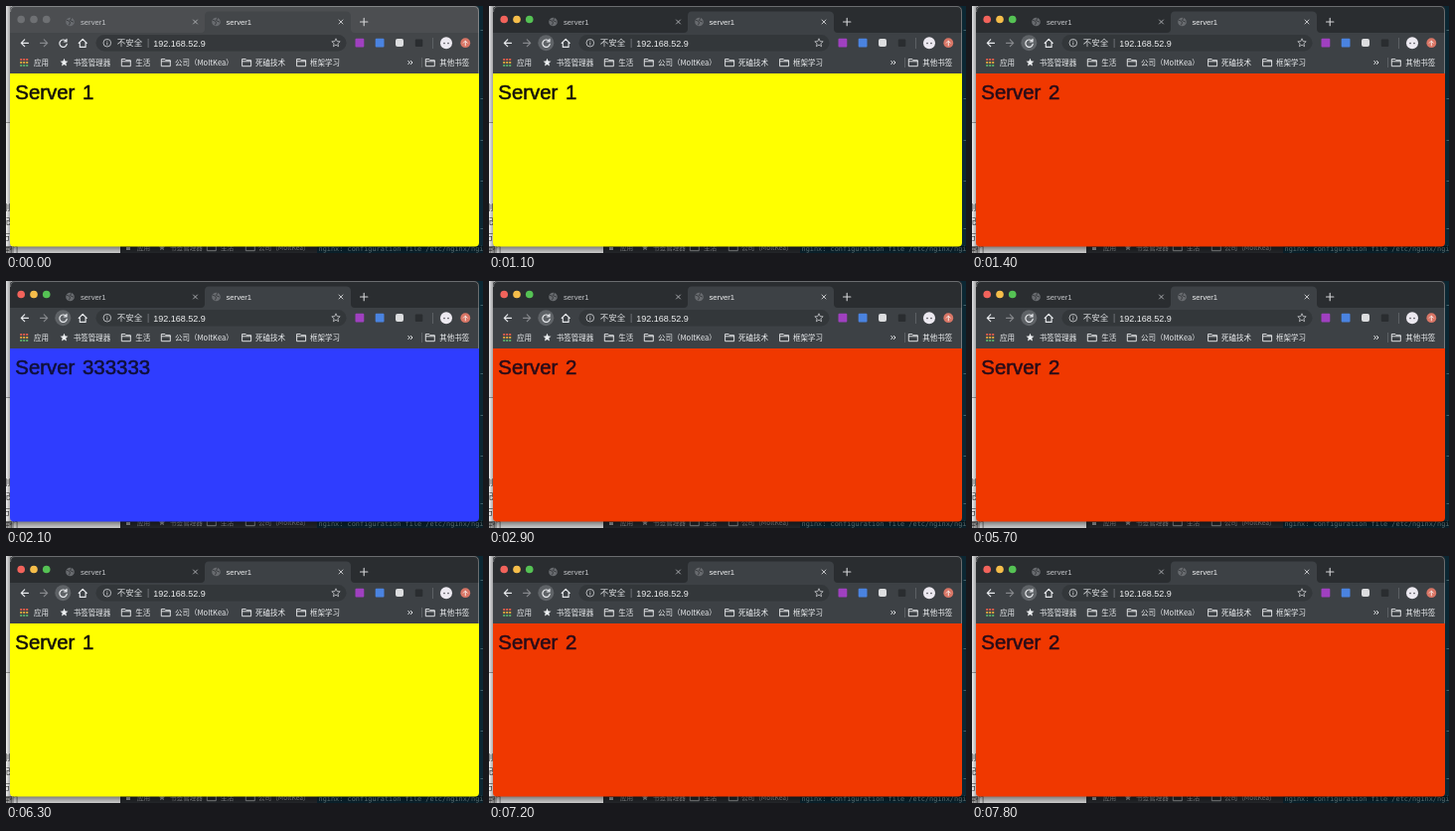
Recreate the animation shown at these times as an HTML page. Size 480 px wide and 249 px high, loop 8000 ms.

```html
<!DOCTYPE html>
<html lang="zh">
<head>
<meta charset="utf-8">
<title>Server demo</title>
<style>
html, body { margin: 0; width: 100%; height: 100%; overflow: hidden; background: #0b2733; }
svg { display: block; width: 100%; height: 100%; }
text { font-family: "Liberation Sans", "Noto Sans CJK SC", "Noto Sans CJK", sans-serif; white-space: pre; }
.cjk { font-family: "Noto Sans CJK SC", "Noto Sans CJK", sans-serif; font-weight: 500; }
.mono { font-family: "DejaVu Sans Mono", monospace; }
.line { fill: none; stroke-linecap: round; stroke-linejoin: round; }
#head { font-size: 20.4px; word-spacing: 2px; stroke-width: .55px; }
</style>
</head>
<body>
<svg id="stage" viewBox="0 0 480 249" preserveAspectRatio="none">
  <defs>
    <clipPath id="win"><rect x="4" y="0" width="472" height="242.5" rx="4"/></clipPath>
    <linearGradient id="edge">
      <stop offset="0" stop-color="#000" stop-opacity="0"/>
      <stop offset="1" stop-color="#000" stop-opacity=".35"/>
    </linearGradient>
    <linearGradient id="under" x2="0" y2="1">
      <stop offset="0" stop-color="#000" stop-opacity=".5"/>
      <stop offset="1" stop-color="#000" stop-opacity=".15"/>
    </linearGradient>
  </defs>
  <g id="desk"></g>
  <g clip-path="url(#win)">
    <rect id="strip" x="4" width="473" height="28"/>
    <path id="bar" d="M4 27H196Q200 27 200 23V10Q200 5.5 204 5.5H342Q347 5.5 347 10V23Q347 27 351 27H477V69H4Z"/>
    <rect id="page" x="4" y="68" width="473" height="175"/>
    <g id="chrome"></g>
    <text id="head" x="9.3" y="94"></text>
  </g>
  <path d="M4.5 6Q4.5 .5 9 .5H471Q475.5 .5 475.5 6V68" fill="none" stroke="#fff" stroke-opacity=".3"/>
</svg>
<script>
const LOOP = 8000;
const YELLOW = ['#ffff00', '#15120a', 'Server 1'];
const RED = ['#f03800', '#2a0c18', 'Server 2'];
const BLUE = ['#2f3dff', '#10103a', 'Server 333333'];
// Weighted round robin: the second server answers most reloads.
const PAGES = [[0, YELLOW], [1200, RED], [2000, BLUE], [2700, RED], [5900, YELLOW], [6800, RED]];
const FOCUS = 100;

const $ = id => document.getElementById(id);
function add(parent, tag, attrs, content) {
  const el = document.createElementNS('http://www.w3.org/2000/svg', tag);
  for (const k in attrs) el.setAttribute(k, attrs[k]);
  if (content) el.textContent = content;
  parent.appendChild(el);
  return el;
}
const rect = (p, x, y, width, height, fill, rx = 0) => add(p, 'rect', { x, y, width, height, fill, rx });
const dot = (p, cx, cy, r, fill) => add(p, 'circle', { cx, cy, r, fill });
const line = (p, d, stroke, w = 1) => add(p, 'path', { d, stroke, 'stroke-width': w, class: 'line' });
const label = (p, x, y, size, fill, str, cls = '') =>
  add(p, 'text', { x, y, 'font-size': size, fill, class: cls }, str);

function star(p, x, y, r, fill, stroke = 'none') {
  const pts = Array.from({ length: 10 }, (_, i) => {
    const a = i * Math.PI / 5 - Math.PI / 2, q = i % 2 ? r * 0.45 : r;
    return (x + q * Math.cos(a)).toFixed(2) + ',' + (y + q * Math.sin(a)).toFixed(2);
  });
  add(p, 'polygon', { points: pts.join(' '), fill, stroke, 'stroke-width': 0.8 });
}
const folder = (p, x, y, c) =>
  line(p, `M${x - 4.3} ${y - 3.5}h3.2l1 1.2h4.4v6h-8.6zM${x - 4.3} ${y - 1.2}h8.6`, c, 0.9);
const cross = (p, x, y, c) => line(p, `M${x - 2} ${y - 2}l4 4m0 -4l-4 4`, c, 0.9);

function drawDesk(g) {
  rect(g, 0, 0, 480, 249, '#0b2733');
  rect(g, 0, 0, 115, 249, '#f1f1f1');
  rect(g, 0, 0, 6, 117, '#e2e3e5');
  rect(g, 0, 117, 6, 1, '#999');
  [['刚', 206], ['配', 220], ['万', 236]].forEach(([c, y]) => label(g, -3.8, y, 8, '#333', c, 'cjk'));
  label(g, -4, 249, 8, '#333', '在们', 'cjk');
  rect(g, 115, 240, 198, 9, '#292c30');
  const c = '#a9abad';
  rect(g, 121, 243, 4, 3, c);
  [[132, '应用'], [165, '书签管理器'], [216, '生活'], [254, '公司（MoltKea）']]
    .forEach(([x, s]) => label(g, x, 246.4, 6.6, c, s, 'cjk'));
  star(g, 157, 243.5, 3.4, c);
  folder(g, 207, 243, c);
  folder(g, 246, 243, c);
  label(g, 314.5, 247, 6.9, '#7f999c', 'nginx: configuration file /etc/nginx/nginx.conf', 'mono');
  [24, 93, 135, 176, 224].forEach(y => rect(g, 477.5, y, 2.5, 1, '#416069'));
  rect(g, 0, 0, 5, 249, 'url(#edge)');
  rect(g, 0, 242, 480, 7, 'url(#under)');
}

function drawTabs(g) {
  [64.5, 211.5].forEach(x => {
    dot(g, x, 16, 4.3, '#686b6f');
    line(g, `M${x - 3} 14.5l2 .5 1 2 -1 2M${x + 1} 12.5l-1 2 3 1.5`, '#36383b', 0.9);
  });
  label(g, 75, 18.8, 7.7, '#c3c5c8', 'server1');
  label(g, 221.5, 18.8, 7.7, '#eeeff0', 'server1');
  cross(g, 190.5, 16, '#b4b6b9');
  cross(g, 337, 16, '#d0d1d3');
  line(g, 'M356.5 16h7.4m-3.7 -3.7v7.4', '#d5d6d8', 1.1);
}

function drawToolbar(g) {
  const c = '#e8eaed';
  line(g, 'M22.5 37.3h-7m3.2 -3.4l-3.4 3.4 3.4 3.4', c, 1.2);
  line(g, 'M34.5 37.3h7m-3.2 -3.4l3.4 3.4 -3.4 3.4', '#85878b', 1.2);
  line(g, 'M60.3 35.2a3.7 3.7 0 1 0 .9 3.2M61 33.4v2.6h-2.6', c, 1.2);
  line(g, 'M73.2 37.5l4 -4.2 4 4.2M74.3 37v4.4h5.8v-4.4', c, 1.1);
  add(g, 'circle', { cx: 101.8, cy: 37.2, r: 3.8, fill: 'none', stroke: '#c6c8cb', 'stroke-width': 0.9 });
  line(g, 'M101.8 36.9v2.1M101.8 35.1v.1', '#c6c8cb', 0.9);
  label(g, 111.7, 40.3, 8.5, '#dcdee0', '不安全', 'cjk');
  rect(g, 142.7, 33, 0.8, 9, '#7a7d81');
  label(g, 148.3, 40.5, 9, '#f1f2f3', '192.168.52.9');
  star(g, 332, 37.2, 4.4, 'none', '#c9cbce');
  rect(g, 351.5, 32.8, 8.8, 8.8, '#a040c0', 1);
  rect(g, 371.7, 32.8, 8.8, 8.8, '#4a83e0', 1);
  rect(g, 392, 33, 8, 8, '#dcdddf', 2);
  rect(g, 411.8, 33.5, 7.5, 7.5, '#2a2d30', 1);
  rect(g, 429, 32, 0.8, 11, '#65686c');
  dot(g, 443, 37.2, 6, '#ece9f0');
  [441, 445].forEach(x => dot(g, x, 37.6, 0.8, '#4a4850'));
  dot(g, 462.3, 37.2, 4.9, '#d97666');
  line(g, 'M462.3 39.8v-4.6m-2 2l2 -2 2 2', '#f6e6e2', 1);
}

function drawBookmarks(g) {
  const c = '#eceef0', dots = ['#d95b4c', '#d9a33d', '#58a869'];
  for (let i = 0; i < 9; i++) rect(g, 14.2 + i % 3 * 3, 53 + (i / 3 | 0) * 3, 2, 2, dots[i / 3 | 0]);
  star(g, 58.5, 57, 4.2, c);
  [121, 161, 242.3, 297.3, 427].forEach(x => folder(g, x, 57, c));
  [[28, '应用'], [67.7, '书签管理器'], [130.3, '生活'], [170, '公司（MoltKea）'],
   [251, '死磕技术'], [306, '框架学习'], [436.3, '其他书签']]
    .forEach(([x, s]) => label(g, x, 59.8, 7.5, c, s, 'cjk'));
  line(g, 'M404.8 55.4l1.6 1.6 -1.6 1.6m2.6 -3.2l1.6 1.6 -1.6 1.6', c, 1);
  rect(g, 418, 52, 0.8, 10, '#65686c');
}

drawDesk($('desk'));
const g = $('chrome');
const lights = [15.2, 28, 40.7].map(x => dot(g, x, 13.5, 3.8, '#6a6c6f'));
const hover = dot(g, 57.3, 37.2, 8, '#5f6367');
const box = rect(g, 90.5, 29, 252, 16.5, '#202124', 8.2);
drawTabs(g);
drawToolbar(g);
drawBookmarks(g);

const LIGHTS = ['#f2635b', '#f5bd4a', '#55c254'];
function frame(now) {
  const t = now % LOOP, on = t >= FOCUS;
  const [bg, ink, str] = PAGES.filter(p => p[0] <= t).pop()[1];
  const head = $('head');
  $('page').setAttribute('fill', bg);
  head.setAttribute('fill', ink);
  head.setAttribute('stroke', ink);
  if (head.textContent !== str) head.textContent = str;
  $('strip').setAttribute('fill', on ? '#2a2d30' : '#4c4e51');
  $('bar').setAttribute('fill', on ? '#3d4145' : '#434649');
  box.setAttribute('fill', on ? '#33373a' : '#35383b');
  hover.setAttribute('opacity', on ? 1 : 0);
  lights.forEach((l, i) => l.setAttribute('fill', on ? LIGHTS[i] : '#6e7073'));
  requestAnimationFrame(frame);
}
frame(0);
</script>
</body>
</html>
```
